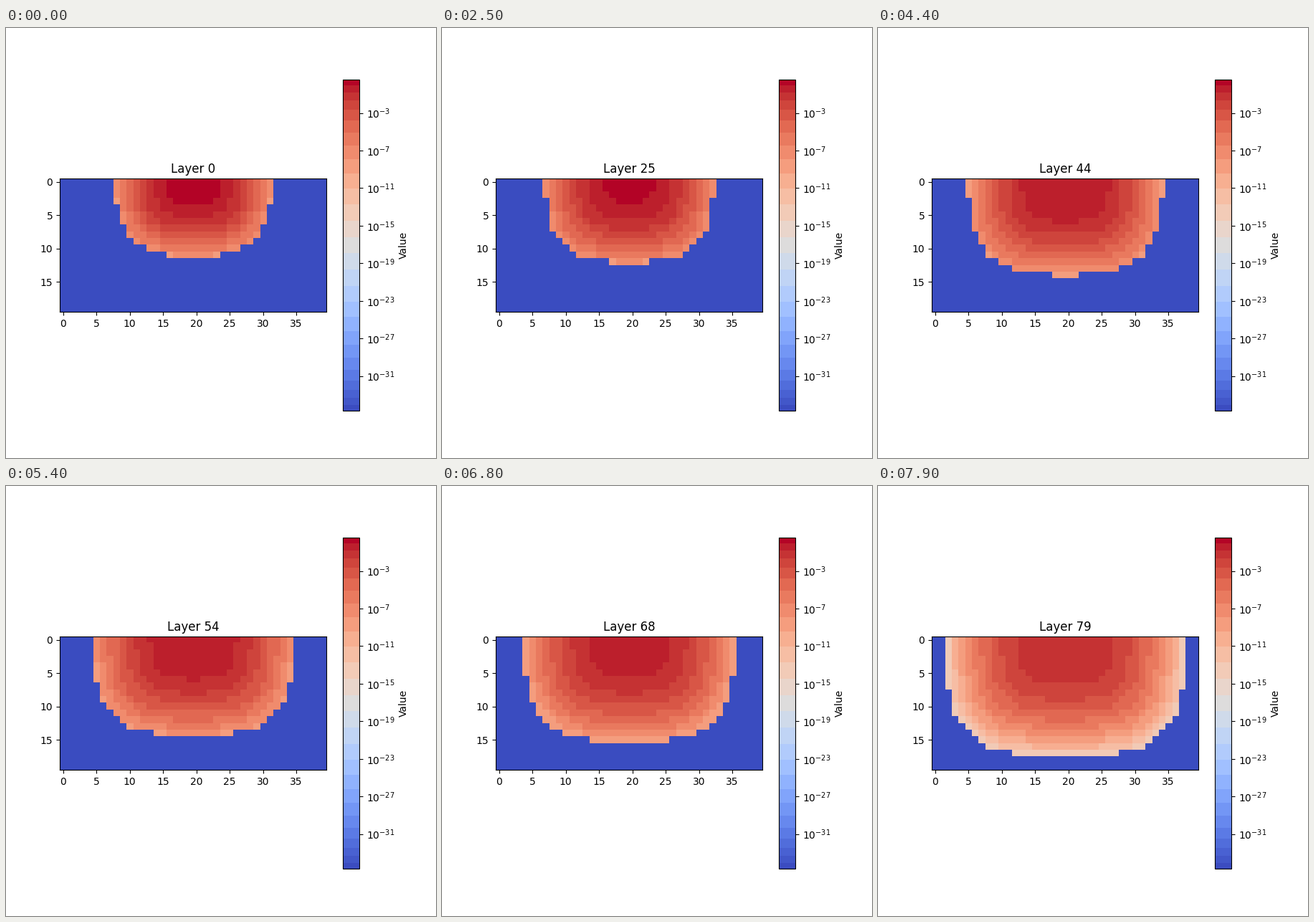
These frames come from a looping animation (600x600 px, 8000 ms). A matplotlib script:

```python
import numpy as np
import matplotlib.pyplot as plt
from matplotlib.animation import FuncAnimation
from matplotlib.colors import ListedColormap

LAYERS, ROWS, COLS = 80, 20, 40
LOW, HIGH = -34.695, 0.551  # exponents of ten
BANDS = 27

# the plume keeps its size at first, then widens, slows and widens again
KEY_LAYER = [18, 32, 44, 62, 68, 72, 79]
KEY_RADIUS = [11.625, 13.534, 14.532, 15.24, 15.861, 16.42, 17.999]

DX = np.abs(np.arange(COLS) - (COLS - 1) / 2)[None, :]
DY = 1.001 * (np.arange(ROWS) + 0.5)[:, None]


def banded_coolwarm():
    """Coolwarm in flat bands, narrow at both ends and wide in the middle."""
    u = np.linspace(-1, 1, BANDS + 1)
    edges = 0.5 + 0.2 * u + 0.3 * np.sin(np.pi * u / 2)
    shades = (edges[:-1] + edges[1:]) / 2
    shades[0], shades[-1] = 0, 1
    pos = (np.arange(1024) + 0.5) / 1024
    band = np.searchsorted(edges, pos) - 1
    return ListedColormap(plt.get_cmap("coolwarm")(shades[band]))


def field(layer):
    """Exponents of a plume that fades as it grows; empty cells sit at LOW."""
    radius = np.interp(layer, KEY_LAYER, KEY_RADIUS)
    growth = (radius - KEY_RADIUS[0]) / (KEY_RADIUS[-1] - KEY_RADIUS[0])
    centre = 0.28 - 0.57 * growth - 0.62 * growth ** 3
    rim = -7.95 - 6.1 * growth ** 4
    power = 3 + 0.2 * growth ** 8
    s = (DX / radius) ** power + (DY / radius) ** power
    return np.where(s <= 1, centre + (rim - centre) * s, LOW)


fig, ax = plt.subplots(figsize=(6, 6), dpi=100)
image = ax.imshow(field(0), cmap=banded_coolwarm(), vmin=LOW, vmax=HIGH,
                  interpolation="nearest")
title = ax.set_title("Layer 0")

bar = fig.colorbar(image, ax=ax, label="Value")
powers = list(range(-31, 0, 4))
bar.set_ticks(powers, labels=[rf"$\mathdefault{{10^{{{p}}}}}$" for p in powers])
bar.minorticks_off()


def update(layer):
    image.set_data(field(layer))
    title.set_text(f"Layer {layer}")
    return image, title


anim = FuncAnimation(fig, update, frames=LAYERS, interval=100,
                     repeat=True, repeat_delay=0, blit=False)
plt.show()
```
